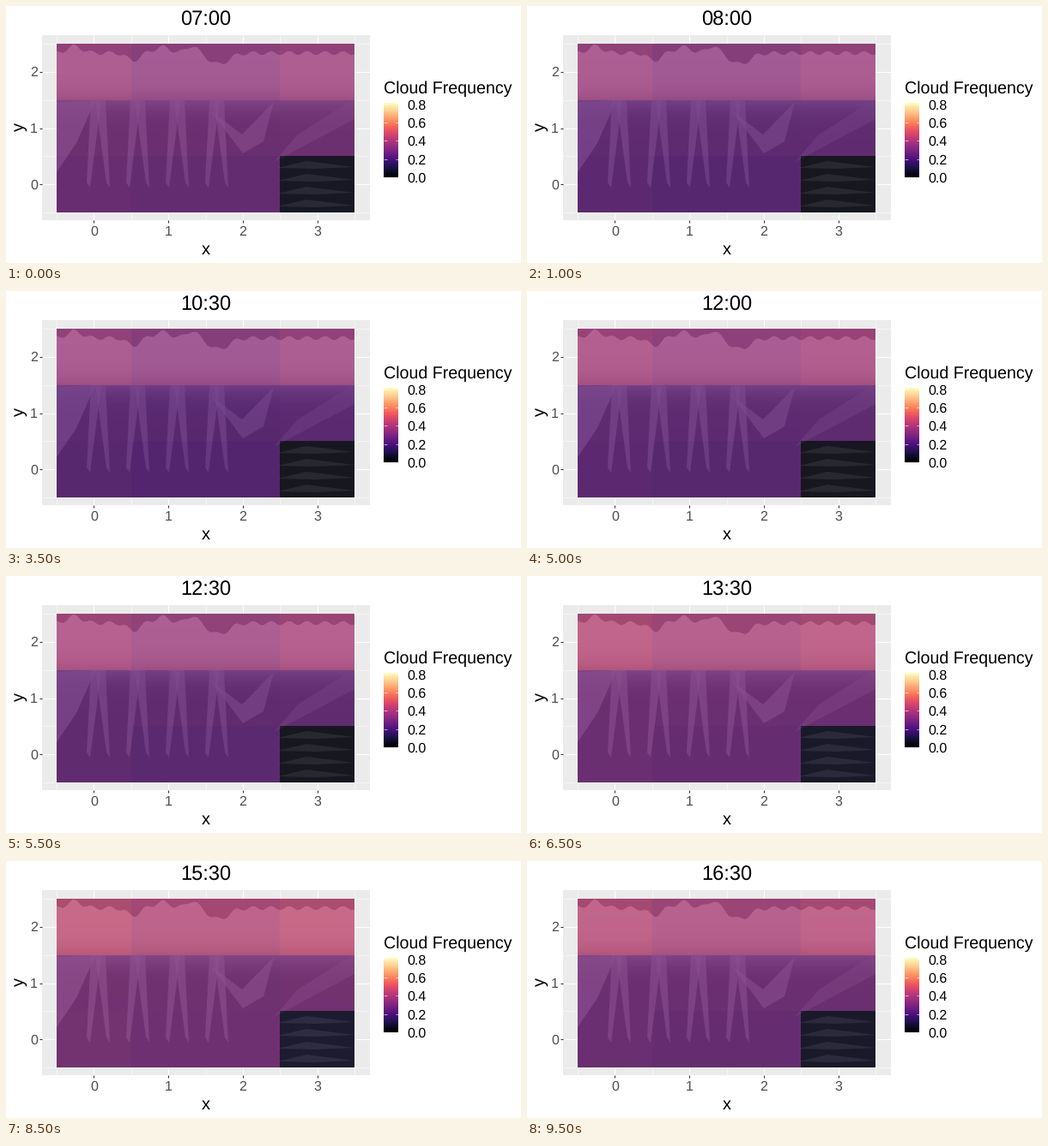
Write a matplotlib script that moves like this. It is 600 px wide and 300 px high and loops after 10 s.

```python
import numpy as np
import matplotlib.pyplot as plt
from matplotlib.animation import FuncAnimation
from matplotlib.patches import Polygon, Rectangle

DPI = 100
PX = 72 / DPI  # points per pixel
FRAMES, INTERVAL = 20, 500

plt.rcParams["font.family"] = "Liberation Sans"
plt.rcParams["text.hinting"] = "none"
fig = plt.figure(figsize=(6, 3), dpi=DPI, facecolor="white")
ax = fig.add_axes([0, 0, 1, 1])
ax.set_axis_off()

LEFT, RIGHT, TOP, BOTTOM = 59, 406, 44, 241
COLS = np.round(np.linspace(LEFT + 0.3, RIGHT, 5))
ROWS = np.round(np.linspace(TOP, BOTTOM, 4))
cmap = plt.get_cmap("magma")


def box(x0, y0, x1, y1, color, **kw):
    return ax.add_patch(Rectangle((x0, y0), x1 - x0, y1 - y0, facecolor=color,
                                  linewidth=0, antialiased=False, **kw))


def line(x0, y0, x1, y1, color, width, z=2):
    ax.plot([x0, x1], [y0, y1], color=color, lw=width * PX, zorder=z,
            solid_capstyle="butt")


def label(x, y, text, size, color="black", ha="center", **kw):
    return ax.text(x, y, text, fontsize=size * PX, color=color, ha=ha,
                   va="baseline", **kw)


def tone(level):
    """Slightly cool grey."""
    return level, level, level + 0.06


def photo_shape(points, level, alpha=1.0):
    shape = Polygon(points, facecolor=tone(level), alpha=alpha, linewidth=0, zorder=5)
    ax.add_patch(shape)
    shape.set_clip_path(sky)
    return shape


def draw_axes():
    box(42, 34, 424, 250, "#EBEBEB", zorder=1)
    for x in COLS:
        line(x, 34, x, 250, "white", 0.55)
    for y in ROWS:
        line(42, y, 424, y, "white", 0.55)
    for i in range(4):
        x = 102.4 + 86.75 * i
        line(x, 34, x, 250, "white", 1.07)
        line(x, 250, x, 253, "#333333", 1.07)
        label(x, 268, str(i), 16, "#4D4D4D")
    for i in range(3):
        y = 208.2 - 65.6 * i
        line(42, y, 424, y, "white", 1.07)
        line(39, y, 42, y, "#333333", 1.07)
        label(37, y + 5.5, str(i), 16, "#4D4D4D", ha="right")
    label(233, 290, "x", 20)
    label(21, 141.5, "y", 20, rotation=90, rotation_mode="anchor")


def draw_mountain():
    # Ridge: a wavy line with three summits and two saddles
    x = np.linspace(LEFT, RIGHT, 90)
    ridge = 55 + 2.5 * np.sin(0.3 * x)
    for center, height, width in ((80, -8, 12), (148, 9, 10), (182, -7, 13),
                                  (217, -9, 9), (248, 13, 16)):
        ridge += height * np.exp(-((x - center) / width) ** 2)
    outline = [*zip(x, ridge), (RIGHT, BOTTOM), (LEFT, BOTTOM)]
    mountain = photo_shape(outline, 0.5)

    # Snowy top fading to dark scree
    y = np.arange(TOP, BOTTOM)
    level = 0.26 + 0.42 / (1 + np.exp((y - 112) / 9))
    shade = ax.imshow(np.array([[tone(v)] for v in level]), aspect="auto",
                      extent=(LEFT, RIGHT, BOTTOM, TOP), zorder=5)
    shade.set_clip_path(mountain)

    # Snow: side fields, tapering gullies and the far slope
    photo_shape([(LEFT, 112), (104, 110), (82, 160), (LEFT, 194)], 0.6, 0.7)
    photo_shape([(238, 122), (275, 150), (312, 112), (300, 158), (276, 172)], 0.6, 0.6)
    photo_shape([(RIGHT, 108), (RIGHT, 132), (312, 182), (340, 150)], 0.5, 0.5)
    for i in range(8):
        foot = 96 + 23 * i
        head = foot + 9 * (-1) ** i
        photo_shape([(head - 6, 110), (head + 6, 110), (foot + 2, 212),
                     (foot - 2, 206)], 0.62, 0.6)
    for i in range(4):
        y = 184 + 15 * i
        photo_shape([(316, y + 5), (350, y - 3), (RIGHT, y + 4), (360, y + 6)], 0.58, 0.6)


def draw_legend():
    label(440, 102, "Cloud Frequency", 19.6, ha="left")
    ax.imshow(np.linspace(1, 0, 100)[:, None], cmap=cmap, vmin=0, vmax=1,
              aspect="auto", extent=(440, 457, 200.5, 114), zorder=5)
    for i in range(5):
        y = 200 - 21.4 * i
        line(440, y, 443.5, y, "white", 0.6, 6)
        line(453.5, y, 457, y, "white", 0.6, 6)
        label(467, y + 6, f"{0.2 * i:.1f}", 16, ha="left")


def frequency(row, col, step):
    """Dips in the morning, peaks in the afternoon; higher towards the sides."""
    peak = np.exp(-((step - 16) / 5) ** 2)
    early = np.exp(-step / 2)
    base = (0.365, 0.24, 0.225)[row]
    value = base + (0.09, 0.08, 0.095)[row] * peak + (0.01, 0.06, 0.055)[row] * early
    if row == 2 and col == 3:  # nearly cloud-free corner
        return max(0, value - 0.25) * 0.7
    spread = (0.014, 0.002, 0.008)[row]
    return value + spread * ((col - 1.5) ** 2 - 1.25)


draw_axes()
sky = box(LEFT, TOP, RIGHT, BOTTOM, (0.36, 0.36, 0.46), zorder=3)
draw_mountain()
draw_legend()
title = label(232.7, 23, "07:00", 23.6)
tiles = {(r, c): box(COLS[c], ROWS[r], COLS[c + 1], ROWS[r + 1], "black",
                     alpha=0.65, zorder=8)
         for r in range(3) for c in range(4)}

ax.set_xlim(0, 600)
ax.set_ylim(300, 0)


def update(step):
    minutes = 7 * 60 + 30 * step
    title.set_text(f"{minutes // 60:02d}:{minutes % 60:02d}")
    for (row, col), tile in tiles.items():
        tile.set_facecolor(cmap(frequency(row, col, step) / 0.8)[:3])
    return [title, *tiles.values()]


anim = FuncAnimation(fig, update, frames=FRAMES, interval=INTERVAL,
                     repeat=True, repeat_delay=0)
plt.show()
```
